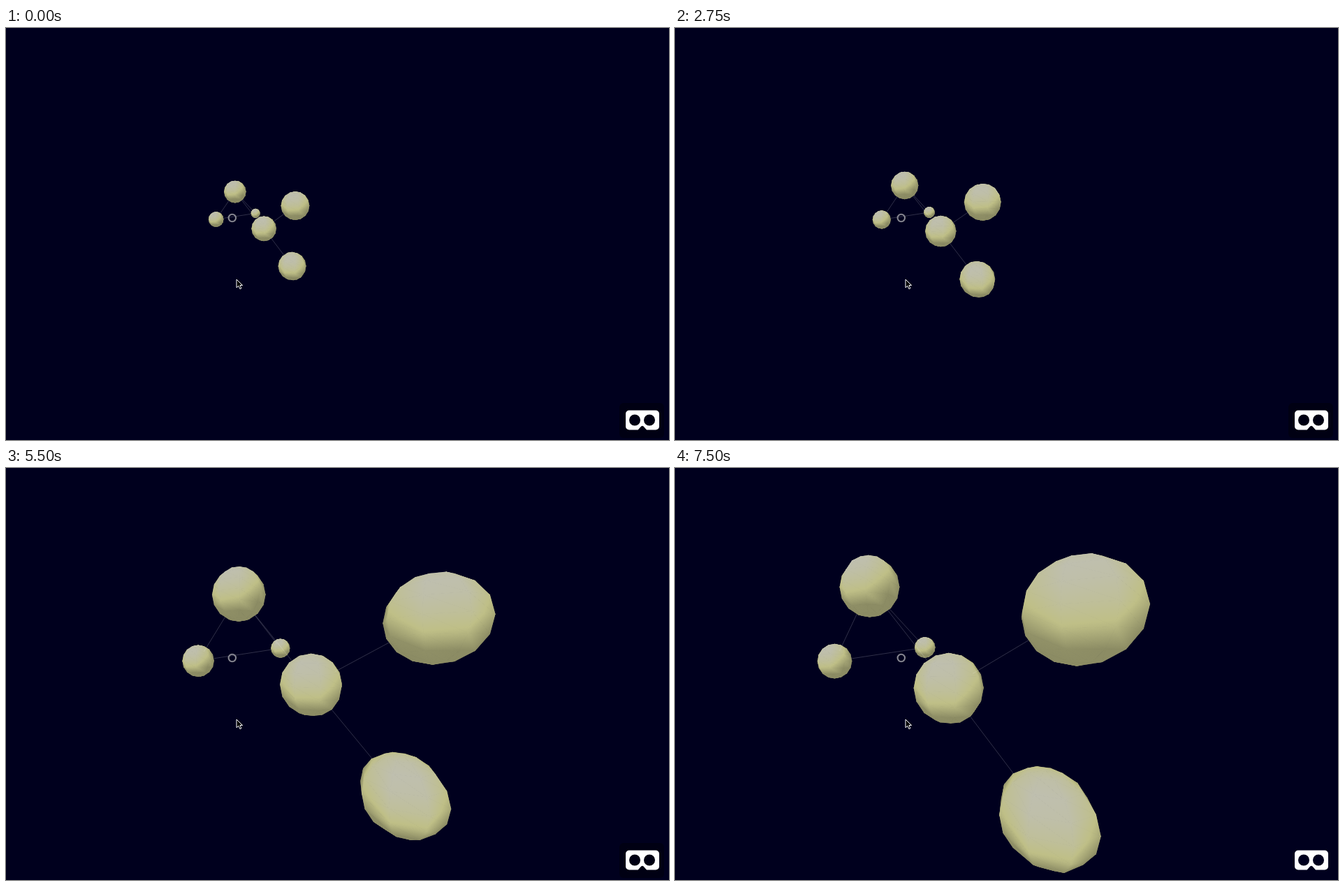
Animation of 949x590 px, one loop 8 s. Source, as an HTML page with a canvas:

```html
<!DOCTYPE html>
<html lang="en">
<head>
<meta charset="utf-8">
<title>Node graph fly-in</title>
<style>
  html, body { margin: 0; width: 100%; height: 100%; overflow: hidden; background: #00001e; }
  canvas, svg { position: absolute; left: 0; top: 0; width: 949px; height: 590px; }
  #shade { animation: shade 8s step-end infinite; }
  @keyframes shade { 0% { opacity: 1; } 93.75% { opacity: 0; } }
</style>
</head>
<body>
<canvas id="stage" width="949" height="590"></canvas>
<svg viewBox="0 0 949 590">
  <circle cx="323.8" cy="272" r="5.2" fill="none" stroke="#85858f" stroke-width="2.1"/>
  <path d="M330 360v11.8l2.8-2.5 2.1 4.4 2-.9-2-4.3h3.6z" fill="#000" stroke="#fff"/>
  <rect id="shade" x="878" y="537" width="64" height="50" rx="6" fill="#000" fill-opacity=".35"/>
  <path fill="#fff" fill-rule="evenodd" d="M892 547.5h38a5 5 0 0 1 5 5v18a5 5 0 0 1-5 5h-13l-4.5-5q-1.7-1.5-3.4 0l-4.5 5H892a5 5 0 0 1-5-5v-18a5 5 0 0 1 5-5z
    M892 561.5a8 8 0 1 0 16 0a8 8 0 1 0-16 0z M913 561.5a8 8 0 1 0 16 0a8 8 0 1 0-16 0z"/>
</svg>
<script>
const ctx = document.getElementById('stage').getContext('2d');
const LOOP = 8000, STEP = 250, CX = 324, CY = 272, FOCAL = 395, SEG = 8;
const AMBIENT = 0.733, DIRECT = 0.6, LIGHT = [-1 / 3, 2 / 3, 2 / 3];

// x, y, depth, radius
const nodes = {
  top:   [0.0165, 0.1617, 1.7045, 0.0685],
  left:  [-0.1127, -0.0097, 1.910, 0.0525],
  small: [0.162, 0.0325, 1.93, 0.0322],
  mid:   [0.191, -0.0647, 1.67, 0.0755],
  big:   [0.3317, 0.0642, 1.4568, 0.0755],
  low:   [0.3355, -0.270, 1.548, 0.0785]
};
const links = [['top', 'left'], ['left', 'small'], ['top', 'small'],
               ['top', 'mid'], ['mid', 'big'], ['mid', 'low']];

// unit sphere: normals, light per vertex and triangles
const verts = [], tris = [];
for (let i = 0; i <= SEG; i++) {
  for (let j = 0; j <= SEG; j++) {
    const lat = i / SEG * Math.PI, lon = j / SEG * 2 * Math.PI;
    const n = [-Math.cos(lon) * Math.sin(lat), Math.cos(lat), Math.sin(lon) * Math.sin(lat)];
    const dot = n.reduce((s, v, k) => s + v * LIGHT[k], 0);
    verts.push({ n, lum: AMBIENT + DIRECT * Math.max(0, dot) });
    if (i < SEG && j < SEG) {
      const b = i * (SEG + 1) + j, c = b + SEG + 1;
      tris.push([b + 1, b, c + 1], [b, c, c + 1]);
    }
  }
}

function tone(lum) {
  const r = Math.min(1, lum) * 191, b = lum * 127.5 + 7;
  return `rgb(${r},${r},${b})`;
}

function camera(n) {
  let z = 0;
  if (n > 23) z = 1.075;
  else if (n > 7) z = 0.086 + (n - 7) * 0.0609;
  else if (n > 2) z = 0.086 * ((n - 2) / 5) ** 2.5;
  const slide = [0, 0.036, 0.083, 0.0875, 0.0885, 0.089];
  return { z, x: slide[Math.min(5, Math.max(0, n - 23))] };
}

function project(cam, x, y, depth) {
  const k = FOCAL / (depth - cam.z);
  return [CX + (x - cam.x) * k, CY - y * k];
}

function trace(path, pts) {
  pts.forEach((p, i) => i ? path.lineTo(p[0], p[1]) : path.moveTo(p[0], p[1]));
  path.closePath();
}

// linear gradient that interpolates light over one projected triangle
function shade([p, q, r], [a, b, c], area) {
  const gx = ((b - a) * (r[1] - p[1]) - (c - a) * (q[1] - p[1])) / area;
  const gy = ((c - a) * (q[0] - p[0]) - (b - a) * (r[0] - p[0])) / area;
  const len = gx * gx + gy * gy;
  if (len < 1e-10) return tone(a);
  const at = lum => [p[0] + gx * (lum - a) / len, p[1] + gy * (lum - a) / len];
  const g = ctx.createLinearGradient(...at(AMBIENT), ...at(AMBIENT + DIRECT));
  g.addColorStop(0, tone(AMBIENT));
  g.addColorStop((1 - AMBIENT) / DIRECT, tone(1));
  g.addColorStop(1, tone(AMBIENT + DIRECT));
  return g;
}

function drawNode(cam, [x, y, depth, r]) {
  const pts = verts.map(({ n }) => project(cam, x + n[0] * r, y + n[1] * r, depth - n[2] * r));
  const outline = new Path2D(), faces = [];
  for (const t of tris) {
    const [p, q, s] = t.map(i => pts[i]);
    const area = (q[0] - p[0]) * (s[1] - p[1]) - (s[0] - p[0]) * (q[1] - p[1]);
    if (area > -1e-3) continue;
    const path = new Path2D();
    trace(path, [p, q, s]);
    trace(outline, [p, q, s]);
    faces.push([path, shade([p, q, s], t.map(i => verts[i].lum), area)]);
  }
  ctx.save();
  ctx.clip(outline);
  ctx.lineWidth = 1;
  for (const [path, paint] of faces) {
    ctx.fillStyle = ctx.strokeStyle = paint;
    ctx.fill(path);
    ctx.stroke(path);
  }
  ctx.restore();
}

// a link runs from surface to surface
function drawLink(cam, a, b) {
  const d = [0, 1, 2].map(k => b[k] - a[k]), len = Math.hypot(...d);
  const end = (o, r) => project(cam, ...[0, 1, 2].map(k => o[k] + d[k] * r / len));
  ctx.strokeStyle = 'rgba(240,240,240,.2)';
  ctx.lineWidth = 1;
  ctx.beginPath();
  ctx.moveTo(...end(a, a[3]));
  ctx.lineTo(...end(b, -b[3]));
  ctx.stroke();
}

const scene = [
  ...Object.values(nodes).map(n => ({ depth: n[2], draw: cam => drawNode(cam, n) })),
  ...links.map(([s, t]) => {
    const a = nodes[s], b = nodes[t];
    return { depth: Math.min(a[2], b[2]) + 0.001, draw: cam => drawLink(cam, a, b) };
  })
].sort((a, b) => b.depth - a.depth);

let last = -1;
function frame() {
  const n = Math.floor(performance.now() % LOOP / STEP);
  if (n !== last) {
    last = n;
    ctx.fillStyle = '#00001e';
    ctx.fillRect(0, 0, 949, 590);
    const cam = camera(n);
    scene.forEach(item => item.draw(cam));
  }
  requestAnimationFrame(frame);
}
frame();
</script>
</body>
</html>
```
